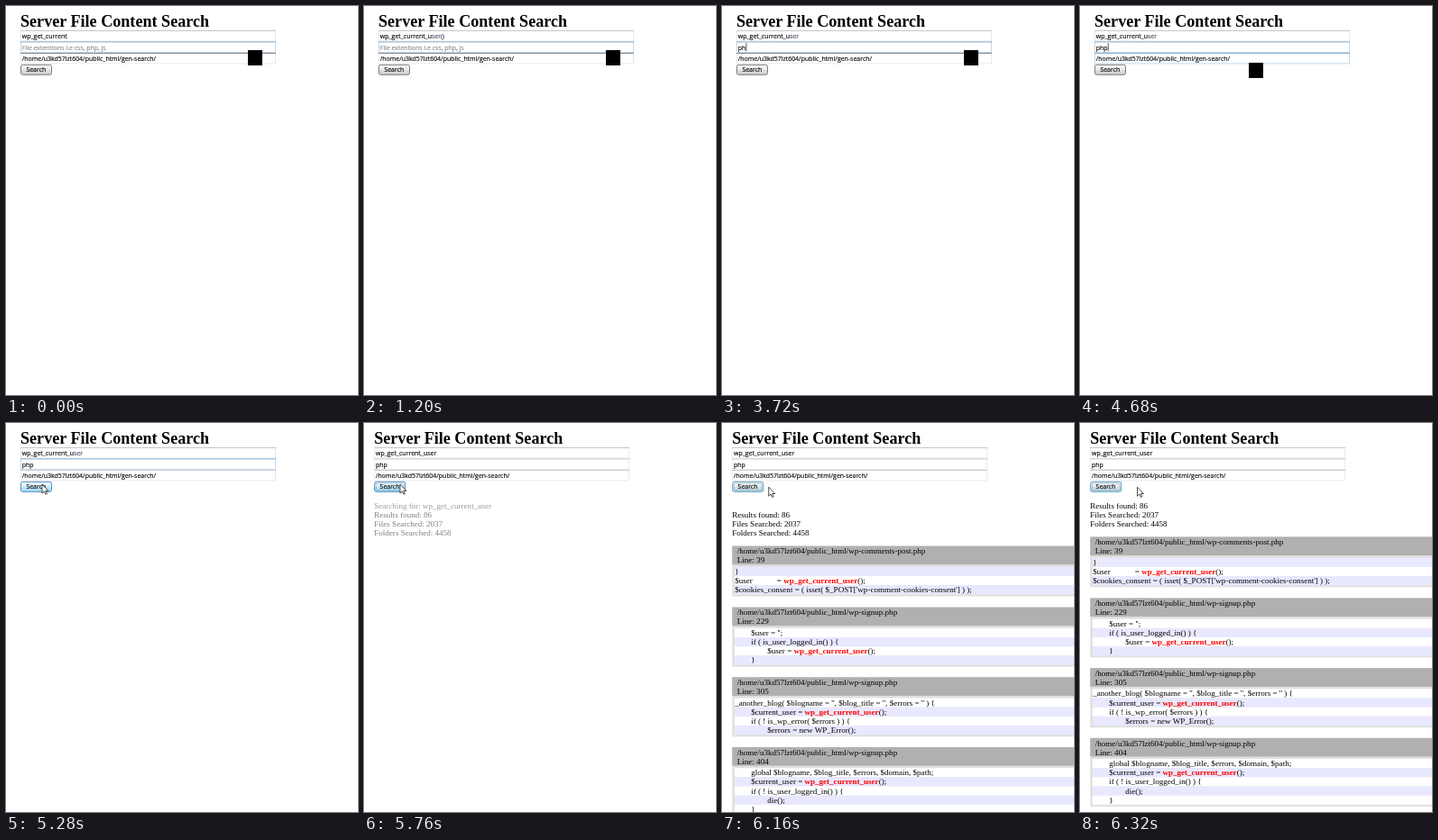
Write an HTML page that moves like this. It is 390 px wide and 432 px high and loops after 8 s.

```html
<!DOCTYPE html>
<html lang="en">
<head>
<meta charset="utf-8">
<title>Server File Content Search</title>
<style>
html, body { margin: 0; width: 100%; height: 100%; overflow: hidden; background: #fff; }
svg { display: block; width: 100vw; height: 100vh; }
text { white-space: pre; }
.serif { font-family: "Liberation Serif", "Times New Roman", serif; font-size: 9.04px; }
.title { font-size: 18.12px; font-weight: bold; }
.ui { font-family: "Open Sans", "Noto Sans", sans-serif; font-size: 6.96px; color: #000; }
.ui, .ui tspan { fill: currentColor; stroke: currentColor; stroke-width: .14; }
.hit { font-weight: bold; fill: #f00; }
</style>
</head>
<body>
<svg id="stage" viewBox="0 0 390 432" preserveAspectRatio="none">
  <defs>
    <clipPath id="reveal"><rect id="revealBox" width="390" height="432"/></clipPath>
    <linearGradient id="face" x2="0" y2="1">
      <stop offset="0"/><stop offset=".5"/><stop offset=".52"/><stop offset="1"/>
    </linearGradient>
  </defs>
  <rect width="390" height="432" fill="#fff"/>
  <g id="page"></g>
  <g id="stats" class="serif"></g>
  <g clip-path="url(#reveal)"><g id="results" class="serif"></g></g>
  <rect id="block" width="16" height="17"/>
  <path id="arrow" d="M0 0V10L2.3 7.9L3.9 11.2L5.4 10.6L3.9 7.3H7Z" fill="#fff" stroke="#222" stroke-width=".8"/>
</svg>
<script>
const LOOP = 8000, STEP = 40, LINE = 10.16;
const NS = "http://www.w3.org/2000/svg";
const ROOT = "/home/u3kd57lzt604/public_html/";
const TERM = "wp_get_current_user";
const $ = id => document.getElementById(id);

function add(parent, tag, attrs, text) {
  const node = document.createElementNS(NS, tag);
  set(node, attrs);
  if (text !== undefined) node.textContent = text;
  parent.appendChild(node);
  return node;
}
function set(node, attrs) {
  for (const key in attrs) node.setAttribute(key, attrs[key]);
}
const show = (node, on) => node.setAttribute("visibility", on ? "visible" : "hidden");
const clamp = v => Math.max(0, Math.min(1, v));
const between = (t, a, b) => t >= a && t < b;

// Last value whose start time has passed
const latest = (keys, t) => keys.reduce((v, [at, next]) => t >= at ? next : v, "");

// Form
const page = $("page");
add(page, "text", { x: 16, y: 23, class: "serif title" }, "Server File Content Search");

function makeField(y) {
  add(page, "rect", { x: 16, y, width: 283, height: 12.4, fill: "#fff" });
  const frame = add(page, "path", { d: `M16.5 ${y}V${y + 12}H298.5V${y}`, fill: "none", "stroke-width": .8 });
  const top = add(page, "path", { d: `M16 ${y + .5}H299`, "stroke-width": 1 });
  const text = add(page, "text", { x: 17.8, y: y + 9.1, class: "ui" });
  const caret = add(page, "rect", { y: y + 1.8, width: .8, height: 9, visibility: "hidden" });
  return { frame, top, text, caret };
}
const borders = {
  plain: ["#c3c6cd", "#e2e4ea"],
  dark: ["#767d84", "#e2e4ea"],
  blue: ["#7fa9c9", "#b0d0e6"]
};
function paintField(field, name) {
  const [top, frame] = borders[name];
  set(field.top, { stroke: top });
  set(field.frame, { stroke: frame });
}
const fields = [27, 39.4, 51.9].map(makeField);
const query = add(fields[0].text, "tspan", {});
const queryEnd = add(fields[0].text, "tspan", {});
fields[2].text.textContent = ROOT + "gen-search/";

const button = add(page, "rect", { x: 16.5, y: 65.3, width: 34, height: 11, rx: 2, fill: "url(#face)", "stroke-width": .9 });
const focusBox = add(page, "rect", { x: 18.3, y: 67.1, width: 30.4, height: 7.4, fill: "none", stroke: "#555", "stroke-width": .5, "stroke-dasharray": ".6 .6" });
add(page, "text", { x: 22.4, y: 73.4, class: "ui" }, "Search");

const faces = {
  plain: ["#6f6f6f", "#f3f3f3", "#ebebeb", "#dddddd", "#cfcfcf"],
  hover: ["#3c7fb1", "#eaf6fd", "#d9f0fc", "#bee6fd", "#a7d9f5"],
  press: ["#2c628b", "#e5f4fc", "#c4e5f6", "#98d1ef", "#68b3db"],
  focus: ["#4b93bd", "#eef5f8", "#e4edf1", "#d3e2ea", "#bcd9e6"]
};
function paintButton(name) {
  const [edge, ...stops] = faces[name];
  set(button, { stroke: edge });
  stops.forEach((c, i) => set($("face").children[i], { "stop-color": c }));
}

// Summary
const searching = add($("stats"), "text", { x: 11.3, y: 94.5 }, "Searching for: " + TERM);
const counts = add($("stats"), "g", {});
["Results found: 86", "Files Searched: 2037", "Folders Searched: 4458"].forEach((line, i) =>
  add(counts, "text", { x: 11.3, y: 104.7 + i * LINE }, line));

// Matches: offset, file, line number, row parity, code (@ stands for the search term)
const tab = " ".repeat(8);
const matches = [
  [0, "wp-comments-post.php", 39, 0, [
    "}",
    "$user" + " ".repeat(12) + "= @();",
    "$cookies_consent = ( isset( $_POST['wp-comment-cookies-consent'] ) );"]],
  [68, "wp-signup.php", 229, 1, [
    tab + "$user = '';",
    tab + "if ( is_user_logged_in() ) {",
    tab + tab + "$user = @();",
    tab + "}"]],
  [145.7, "wp-signup.php", 305, 1, [
    "_another_blog( $blogname = '', $blog_title = '', $errors = '' ) {",
    tab + "$current_user = @();",
    tab + "if ( ! is_wp_error( $errors ) ) {",
    tab + tab + "$errors = new WP_Error();"]],
  [223.4, "wp-signup.php", 404, 1, [
    tab + "global $blogname, $blog_title, $errors, $domain, $path;",
    tab + "$current_user = @();",
    tab + "if ( ! is_user_logged_in() ) {",
    tab + tab + "die();",
    tab + "}"]]
];
for (const [offset, file, number, parity, code] of matches) {
  const g = add($("results"), "g", { transform: `translate(0 ${136.6 + offset})` });
  add(g, "rect", { x: 11.3, width: 390, height: 25.4 + LINE * code.length, fill: "#e0e0e0" });
  add(g, "rect", { x: 11.3, width: 390, height: 20.6, fill: "#b0b0b0" });
  add(g, "text", { x: 16.8, y: 8.9 }, ROOT + file);
  add(g, "text", { x: 16.8, y: 18.7 }, "Line: " + number);
  code.forEach((line, i) => {
    const y = 23.2 + LINE * i;
    add(g, "rect", { x: 13.8, y, width: 390, height: LINE + .05, fill: i % 2 === parity ? "#e8e8ff" : "#fff" });
    const text = add(g, "text", { x: 14.2, y: y + 8.1 });
    line.split("@").forEach((part, k) => {
      if (k) add(text, "tspan", { class: "hit" }, TERM);
      add(text, "tspan", {}, part);
    });
  });
}

// Typing
const BASE = "wp_get_current";
const queryKeys = [[0, ""], [120, "_"], [400, "_u"], [520, "_us"], [640, "_use"], [760, "_user"],
  [1080, "_user("], [1200, "_user()"], [1760, "_user("], [2160, "_user"]];
const typeKeys = [[3080, "p"], [3520, "ph"], [3760, "php"]];

function mouse(t) {
  if (t <= 4680) {
    const p = clamp((t - 4560) / 120);
    return [276 - 81 * p, 57.5 + 14 * p];
  }
  if (t <= 6000) {
    const p = clamp((t - 4680) / 600);
    return [40 + 155 * Math.pow(1 - p, 2.6), 71.5 - 3.5 * p + 6 * Math.sin(Math.PI * p)];
  }
  const p = clamp((t - 6000) / 320);
  return [40 + 23.5 * p, 68 + 3.2 * clamp(p * 2)];
}

function placeCaret(field, on, typed, color) {
  show(field.caret, on);
  if (on) set(field.caret, { x: 18 + (typed ? field.text.getComputedTextLength() : 0), fill: color });
}

function draw(now) {
  const t = Math.floor(now / STEP) * STEP;
  const loaded = t >= 5720;
  const [mx, my] = mouse(t);

  set(page, { transform: `translate(${loaded ? -4.8 : 0} 0)` });

  const typed = latest(queryKeys, t);
  query.textContent = BASE + typed.slice(0, 2);
  queryEnd.textContent = typed.slice(2);
  queryEnd.style.color = loaded ? "#000" : "#54406a";

  const kind = latest(typeKeys, t);
  fields[1].text.textContent = kind || "File extentions i.e css, php, js";
  fields[1].text.style.color = kind ? "#000" : "#888";

  placeCaret(fields[0], between(t, 880, 1080) || between(t, 2280, 2520), true, "#666");
  placeCaret(fields[1], between(t, 2520, 4120) || between(t, 4600, 5120), kind, kind ? "#333" : "#a05fb8");

  paintField(fields[0], "plain");
  paintField(fields[1], loaded ? "plain" : "blue");
  paintField(fields[2], t < 4600 ? "dark" : t < 4720 ? "blue" : "plain");

  const over = t >= 4720 && mx < 51 && my < 77;
  paintButton(between(t, 5440, 5720) ? "press" : over ? "hover" : loaded ? "focus" : "plain");
  show(focusBox, t >= 5440);

  // The search line fades, then the rest closes up
  const lift = t >= 6200 ? -LINE : 0;
  set($("stats"), { opacity: clamp((t - 5680) / 160) });
  set(searching, { opacity: .8 * clamp((6160 - t) / 160) });
  set(counts, { transform: `translate(0 ${lift})` });
  show($("results"), t >= 6000);
  set($("results"), { transform: `translate(0 ${lift})` });
  set($("revealBox"), { height: 149 + 283 * clamp((t - 6000) / 160) });

  show($("block"), t < 4720);
  show($("arrow"), t >= 4720);
  set($("block"), { x: mx - 8, y: my - 8.5 });
  set($("arrow"), { transform: `translate(${mx} ${my})` });
}

const start = performance.now();
function tick() {
  draw((performance.now() - start) % LOOP);
  requestAnimationFrame(tick);
}
tick();
</script>
</body>
</html>
```
